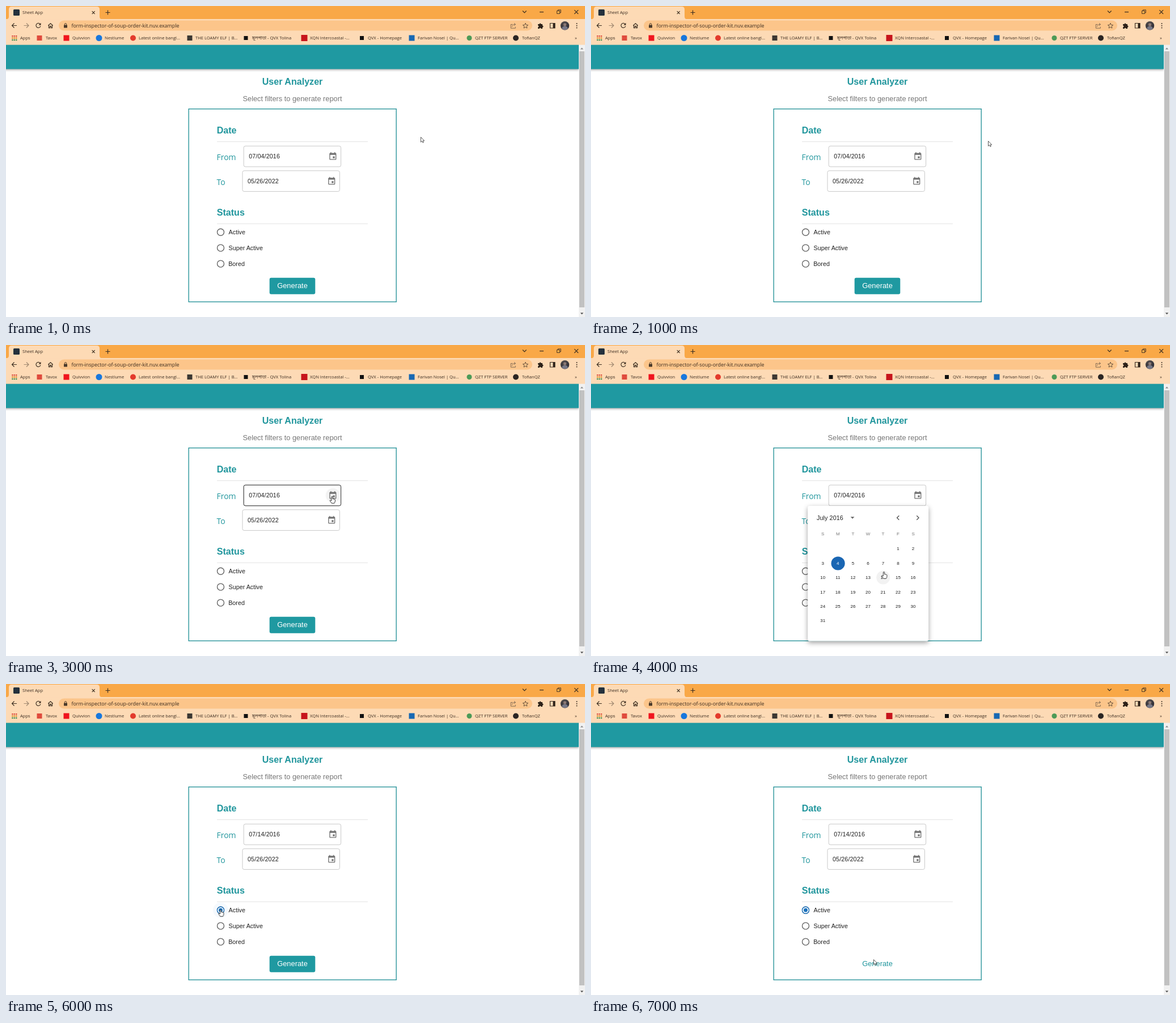
Animation, 1021 px wide and 549 px high, one loop 8000 ms. Source, as an HTML page:

```html
<!DOCTYPE html>
<html lang="en">
<head>
<meta charset="utf-8">
<title>User Analyzer</title>
<style>
html, body { margin: 0; width: 100%; height: 100%; overflow: hidden; background: #fff; }
svg { display: block; width: 1021px; height: 549px; }
text { font-family: "Liberation Sans", Arial, sans-serif; fill: #212121; }
.ui text, text.ui { font-family: "Open Sans", "Noto Sans", "Noto Sans Bengali", sans-serif; }
.ui text { font-size: 7.6px; fill: #3a2c20; }
.ui .url { font-size: 8.9px; }
.line { fill: none; stroke: #3d2f22; stroke-width: 1.2; }
.mid { text-anchor: middle; }
.teal { fill: #21969d; }
.head { font-size: 16.1px; font-weight: bold; }
.label { font-size: 14px; }
.body { font-size: 10.76px; }
.date { letter-spacing: .1px; }
.day { font-size: 8.1px; text-anchor: middle; }
.field { fill: none; stroke: #c8c8c8; stroke-width: 1; }
.radio { fill: none; stroke: #666; stroke-width: 1.4; }
.paper { fill: #fff; filter: drop-shadow(0 3px 4px rgba(0,0,0,.38)); }
.bar { fill: #1f99a1; filter: drop-shadow(0 1.5px 2px rgba(0,0,0,.42)); }

/* eight poses, one second each */
.arrow, .hand, .hover, .picker, .old, .new, .checked, .ring, .btn, .btn-text {
  animation: 8s step-end infinite;
}
.arrow { animation-name: arrow; }
.hand { animation-name: hand; }
.hover { animation-name: hover; }
.picker { animation-name: picker; }
.old { animation-name: old; }
.new { animation-name: new; }
.checked { animation-name: checked; }
.ring { animation-name: ring; }
.btn { fill: #1f99a1; animation-name: btn; }
.btn-text { font-size: 12.9px; fill: #fff; animation-name: btn-text; }
@keyframes arrow {
  0% { transform: translate(731px, 231px); opacity: 1; }
  12.5% { transform: translate(700px, 238px); }
  25% { transform: translate(659.5px, 246px); opacity: 1; }
  37.5% { opacity: 0; }
  62.5% { transform: translate(514.5px, 399.5px); opacity: 1; }
  75% { opacity: 0; }
  87.5%, 100% { transform: translate(498px, 486px); opacity: 1; }
}
@keyframes hand {
  0% { opacity: 0; }
  37.5% { transform: translate(575px, 267px); opacity: 1; }
  50% { transform: translate(516.5px, 400px); opacity: 1; }
  62.5% { opacity: 0; }
  75% { transform: translate(378.5px, 398px); opacity: 1; }
  87.5%, 100% { opacity: 0; }
}
@keyframes hover { 0% { opacity: 0; } 37.5% { opacity: 1; } 50%, 100% { opacity: 0; } }
@keyframes picker { 0% { opacity: 0; } 50% { opacity: 1; } 62.5%, 100% { opacity: 0; } }
@keyframes old { 0% { opacity: 1; } 62.5%, 100% { opacity: 0; } }
@keyframes new { 0% { opacity: 0; } 62.5%, 100% { opacity: 1; } }
@keyframes checked { 0% { opacity: 0; } 75%, 100% { opacity: 1; } }
@keyframes ring { 0% { opacity: 0; } 75% { opacity: 1; } 87.5%, 100% { opacity: 0; } }
@keyframes btn { 0% { fill: #1f99a1; } 87.5%, 100% { fill: #fff; } }
@keyframes btn-text { 0% { fill: #fff; } 87.5%, 100% { fill: #21969d; } }
</style>
</head>
<body>
<svg viewBox="0 0 1021 549">
  <defs>
    <path id="event" transform="scale(.672)" d="M17 12h-5v5h5v-5zM16 1v2H8V1H6v2H5c-1.11 0-1.99.9-1.99 2L3 19c0 1.1.89 2 2 2h14c1.1 0 2-.9 2-2V5c0-1.1-.9-2-2-2h-1V1h-2zm3 18H5V8h14v11z"/>
    <linearGradient id="photo" x2=".4" y2="1">
      <stop stop-color="#55504f"/><stop offset="1" stop-color="#2b2a33"/>
    </linearGradient>
  </defs>
  <rect width="1021" height="549" fill="#fff"/>

  <!-- page -->
  <rect class="bar" x="-6" y="60" width="1016" height="51.3"/>
  <text class="head teal mid" x="505" y="138.5">User Analyzer</text>
  <text class="mid" x="505" y="167.5" font-size="12.8" style="fill:#777">Select filters to generate report</text>
  <rect x="322.2" y="181.7" width="366" height="340.6" fill="none" stroke="#2b959b" stroke-width="1.4"/>

  <text class="head teal" x="371.7" y="224.5">Date</text>
  <path d="M372 239.5H638M372 384.5H638" stroke="#e4e4e4"/>
  <text class="ui label teal" x="371.5" y="271.5">From</text>
  <rect class="field" x="419.2" y="247.2" width="171.4" height="36.6" rx="3"/>
  <g class="hover">
    <rect class="field" x="419.2" y="247.2" width="171.4" height="36.6" rx="3" style="stroke:#333"/>
    <circle cx="576.5" cy="265.5" r="12.8" fill="#f3f3f3"/>
  </g>
  <text class="body date old" x="428.2" y="268.8">07/04/2016</text>
  <text class="body date new" x="428.2" y="268.8">07/14/2016</text>
  <use href="#event" x="568.3" y="257.4" fill="#707070"/>
  <text class="ui label teal" x="371.5" y="315.5">To</text>
  <rect class="field" x="417" y="290.8" width="171.4" height="36.6" rx="3"/>
  <text class="body date" x="426" y="312.6">05/26/2022</text>
  <use href="#event" x="566.2" y="301.2" fill="#707070"/>

  <text class="head teal" x="371.7" y="369.5">Status</text>
  <circle class="ring" cx="378.5" cy="399.2" r="13.5" fill="#f5f9fd"/>
  <circle class="radio" cx="378.5" cy="399.2" r="6"/>
  <g class="checked">
    <circle class="radio" cx="378.5" cy="399.2" r="6" style="stroke:#1b72bd;fill:#fff"/>
    <circle cx="378.5" cy="399.2" r="3.4" fill="#1b72bd"/>
  </g>
  <circle class="radio" cx="378.5" cy="427.1" r="6"/>
  <circle class="radio" cx="378.5" cy="455.1" r="6"/>
  <text class="body" x="392.6" y="403">Active</text>
  <text class="body" x="392.6" y="430.9">Super Active</text>
  <text class="body" x="392.2" y="458.9">Bored</text>

  <rect class="btn" x="464.7" y="479.7" width="80.6" height="29" rx="3"/>
  <text class="btn-text mid" x="505" y="498">Generate</text>

  <!-- date picker -->
  <g class="picker">
    <rect class="paper" x="382.2" y="284" width="213" height="238.8" rx="3"/>
    <text class="body date" x="398" y="308.8">July 2016</text>
    <path d="M457.7 303.3h6.8l-3.4 3.5z" fill="#666"/>
    <path d="M543.3 301.3l-3.7 3.7 3.7 3.7M574.3 301.3l3.7 3.7-3.7 3.7" fill="none" stroke="#555" stroke-width="1.4"/>
    <circle cx="435.6" cy="385.5" r="12.1" fill="#1a66b3"/>
    <circle cx="515.2" cy="410.4" r="12" fill="#f2f2f2"/>
    <g id="days"></g>
  </g>

  <!-- scrollbar -->
  <rect x="1010" y="68" width="11" height="481" fill="#f1f1f1"/>
  <rect x="1011" y="80" width="9" height="452" fill="#c1c1c1"/>
  <path d="M1012.8 76.6h5.4l-2.7-3z" fill="#8a8a8a"/>
  <path d="M1012.8 541.6h5.4l-2.7 3z" fill="#505050"/>

  <!-- browser -->
  <g class="ui">
    <rect width="1021" height="24" fill="#f9a847"/>
    <rect y="23" width="1021" height="45.6" fill="#fddab5"/>
    <path d="M0 23.5q5 0 5-5V6q0-5 5-5h150q5 0 5 5v12.500q0 5 5 5z" fill="#fddab5"/>
    <rect x="13" y="6" width="11" height="11" rx="1.500" fill="#24313d"/>
    <text x="29" y="14.300">Sheet App</text>
    <path class="line" d="M151.700 9.200l5 5m0-5l-5 5M175.500 11.500h8m-4-4v8"/>
    <path class="line" d="M911 8.500l3.300 3.300 3.300-3.300M941 10.700h7M1002.300 7.200l6.800 6.800m0-6.800l-6.800 6.800" stroke-width="1"/>
    <path class="line" d="M971.500 8.500h5v5h-5zM973.300 8.500v-1.700h5v5h-1.700" style="stroke-width:.9"/>

    <path class="line" d="M19 34.500h-8.500m4-4l-4 4 4 4"/>
    <path class="line" d="M31.500 34.500h8.500m-4-4l4 4-4 4" style="stroke:#a08870"/>
    <path class="line" d="M60.200 32a4 4 0 1 0 .7 3.300"/>
    <path d="M61.500 29.700v4h-4z" fill="#3d2f22"/>
    <path class="line" d="M74.300 34.500l4.200-3.800 4.200 3.800M75.500 34v4.700h2v-3h2v3h2V34"/>
    <rect x="93" y="25.500" width="835" height="18" rx="9" fill="#fcc58a"/>
    <rect x="102" y="33.600" width="6" height="5" rx=".7" fill="#4a3a2b"/>
    <path class="line" d="M103.300 34v-1.600a1.700 1.700 0 0 1 3.400 0V34" style="stroke:#4a3a2b;stroke-width:1"/>
    <text class="url" x="115.500" y="37.700">form-inspector-of-soup-order-kit.nuv.example</text>
    <path class="line" d="M893.500 32.500h-3.200v6.700h8v-2.500M892.500 36.500q.5-4 5.500-4m-2-2.200l2.500 2.200-2.500 2.200" style="stroke:#75614d;stroke-width:.9"/>
    <path class="line" d="M916 30.200l1.300 3.100 3.400.3-2.600 2.200.8 3.300-2.900-1.800-2.900 1.800.8-3.300-2.600-2.200 3.400-.3z" style="stroke:#5c4936;stroke-width:.9"/>
    <path d="M938 32h2.500a1.500 1.500 0 0 1 3 0h2.500v2.500a1.500 1.500 0 0 1 0 3v2.500h-2.700a1.300 1.300 0 0 0-2.600 0H938v-2.500a1.400 1.400 0 0 0 0-2.900z" fill="#2d2219"/>
    <path d="M959.500 30.500h8.500v8.500h-8.500z" class="line"/>
    <rect x="964.500" y="30.500" width="3.500" height="8.500" fill="#2d2219"/>
    <circle cx="985.500" cy="34.700" r="7.700" fill="url(#photo)"/>
    <path d="M980 40q1-4.500 5.500-4.500t5.500 4.500a7.700 7.700 0 0 1-11 0z" fill="#777887"/>
    <circle cx="985.500" cy="33" r="2.700" fill="#8b7974"/>
    <g fill="#3d2f22"><circle cx="1006.500" cy="31" r="1"/><circle cx="1006.500" cy="34.700" r="1"/><circle cx="1006.500" cy="38.400" r="1"/></g>
    <g id="marks"></g>
    <text x="1003" y="59">»</text>
  </g>

  <!-- pointers -->
  <path class="arrow" d="M.5 .5v8.800l2.100-1.900 1.400 3 1.400-.7-1.300-2.800h2.700z" fill="#fff" stroke="#333" stroke-width=".8"/>
  <path class="hand" d="M-1 1q1-1.300 2 0v3.500l3 .6q1.600.4 1.500 2l-.5 3.200-1 2h-4.800l-2.800-4.300q-.6-1.300.9-1.200L-1 8z" fill="#fff" stroke="#222" stroke-width=".9"/>
</svg>
<script>
const NS = "http://www.w3.org/2000/svg";
function add(parent, tag, attrs, text = "") {
  const el = document.createElementNS(NS, tag);
  for (const key in attrs) el.setAttribute(key, attrs[key]);
  el.textContent = text;
  parent.append(el);
}

// calendar: weekday initials, then the month starting on a Friday
const days = document.getElementById("days");
const dayX = col => 408.8 + col * 26.55;
[..."SMTWTFS"].forEach((name, col) =>
  add(days, "text", { class: "day", x: dayX(col), y: 335.8, style: "fill:#777" }, name));
for (let day = 1; day <= 31; day++) {
  const cell = day + 4;
  add(days, "text", {
    class: "day", x: dayX(cell % 7), y: 362.4 + Math.floor(cell / 7) * 25.4,
    style: day === 4 ? "fill:#fff" : ""
  }, day);
}

// bookmarks: text x, icon x, icon colour, icon size, round, title
const marks = document.getElementById("marks");
for (let i = 0; i < 9; i++) {
  add(marks, "rect", {
    x: 10.3 + i % 3 * 3.4, y: 52 + Math.floor(i / 3) * 3.4, width: 2.3, height: 2.3,
    fill: ["#dd4b3c", "#d98a25", "#3c8f50"][Math.floor(i / 3)]
  });
}
add(marks, "text", { x: 25, y: 59.2 }, "Apps");
[
  [70, 59, "#df4b3d", 9, 0, "Tavox"],
  [117, 106.5, "#f0141e", 10, 0, "Quivvion"],
  [174, 164, "#1877dd", 11, 1, "Nestlume"],
  [234, 224, "#e33a2c", 10, 1, "Latest online bangl..."],
  [334, 324, "#3c3833", 9, 0, "THE LOAMY ELF | B..."],
  [434, 423, "#111", 7, 0, "মূলপাতা - QVX Tolina"],
  [536, 526, "#c7141c", 11, 0, "XQN Intercoastal -..."],
  [638, 627.5, "#111", 7, 0, "QVX - Homepage"],
  [726, 715.5, "#1768b3", 10, 0, "Farivan Nosel | Qu..."],
  [827, 817, "#4d9a57", 9, 1, "QZT FTP SERVER"],
  [910, 899, "#2a2523", 10, 1, "TofianQZ"]
].forEach(([x, cx, fill, size, round, title]) => {
  add(marks, "rect", {
    x: cx - size / 2, y: 56.5 - size / 2, width: size, height: size,
    rx: round ? size / 2 : 0, fill
  });
  add(marks, "text", { x, y: 59.2 }, title);
});
</script>
</body>
</html>
```
